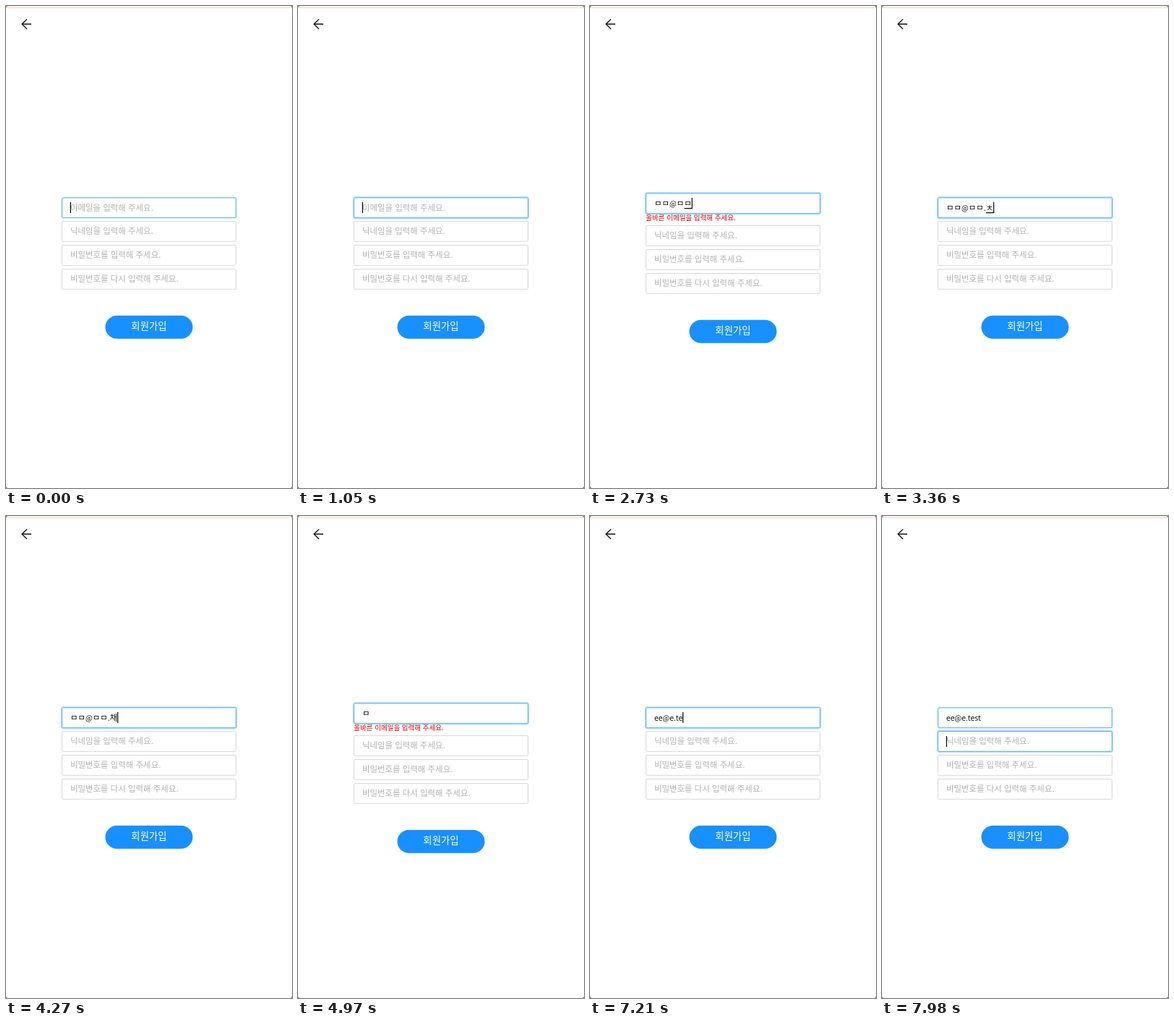
Write an HTML page that moves like this. It is 396 px wide and 666 px high and loops after 8 s.

```html
<!DOCTYPE html>
<html lang="ko">
<head>
<meta charset="utf-8">
<title>회원가입</title>
<style>
html, body { margin: 0; width: 100%; height: 100%; overflow: hidden; background: #fff; }
svg { display: block; width: 396px; height: 666px; font-family: "Noto Sans CJK KR", "Noto Sans CJK", sans-serif; }
.box { fill: #fff; stroke: #d9d9d9; }
.glow { fill: none; stroke: #1890ff; stroke-width: 4.4; stroke-opacity: .2; }
.label { font-size: 11.45px; fill: #b4b4b4; }
#value { font-size: 11.45px; fill: #111; }
#value .latin { font-size: 10.35px; }
#error { font-size: 9.5px; fill: #dc0000; }
#submit { font-size: 13.4px; font-weight: 500; fill: #fff; text-anchor: middle; }
</style>
</head>
<body>
<svg viewBox="0 0 396 666">
  <rect width="396" height="2" fill="#fdf3ee"/>
  <rect y="2" width="396" height="1" fill="#f5ded4"/>
  <path d="M0 0h2L0 2zM396 0h-2l2 2zM0 666h2l-2-2zM396 666h-2l2-2z" fill="#777"/>
  <path d="M35 25H22.5M29 18.3L22 25L29 31.7" fill="none" stroke="#111" stroke-width="1.3"/>
  <g id="first">
    <text id="value" x="89" y="282.6"></text>
    <rect id="underline" y="285" height="1.3" fill="#111"/>
  </g>
  <text id="error" x="77.3" y="296"></text>
  <g id="rest">
    <rect x="137.5" y="427.7" width="121" height="32" rx="16" fill="#1890ff"/>
    <text id="submit" x="198" y="447.4">회원가입</text>
  </g>
  <rect id="caret" y="271" width="1.2" height="15" fill="#000"/>
</svg>
<script>
const LOOP = 8000, FADE = 300, TAB = 7560, SHIFT = 6;
const LABELS = ["이메일을", "닉네임을", "비밀번호를", "비밀번호를 다시"].map(s => s + " 입력해 주세요.");
const INVALID = "올바른 이메일을 입력해 주세요.";

// [time, typed text, caret shown, last syllable still being composed]
const KEYS = [
  [0, "", 1], [560, "", 0], [1050, "", 1],
  [1470, "ㅁ", 1, 1], [1750, "ㅁㅁ", 1, 1], [2100, "ㅁㅁ", 1], [2240, "ㅁㅁ@", 1],
  [2520, "ㅁㅁ@ㅁ", 1, 1], [2730, "ㅁㅁ@ㅁㅁ", 1, 1], [3010, "ㅁㅁ@ㅁㅁ.", 1],
  [3290, "ㅁㅁ@ㅁㅁ.ㅊ", 1, 1], [3500, "ㅁㅁ@ㅁㅁ.채", 1, 1],
  [3990, "ㅁㅁ@ㅁㅁ.채", 0, 1], [4130, "ㅁㅁ@ㅁㅁ.채", 0], [4270, "ㅁㅁ@ㅁㅁ.채", 1],
  [4340, "ㅁㅁ@ㅁㅁ.", 1], [4480, "ㅁㅁ@ㅁㅁ", 1], [4620, "ㅁㅁ@ㅁ", 1],
  [4690, "ㅁㅁ@", 1], [4830, "ㅁㅁ", 1], [4900, "ㅁ", 1], [4970, "ㅁ", 0],
  [5110, "", 1],
  [5530, "e", 1], [5740, "ee", 1], [6230, "ee", 0], [6370, "ee@", 1],
  [6580, "ee@e", 1], [6790, "ee@e.", 1], [7070, "ee@e.t", 1],
  [7140, "ee@e.te", 1], [7280, "ee@e.tes", 1], [7420, "ee@e.test", 1]
];

const $ = id => document.getElementById(id);
const value = $("value"), caret = $("caret"), underline = $("underline"), error = $("error");

const fields = LABELS.map((label, i) => {
  const y = 264.9 + 33 * i - (i ? .4 : 0);
  const g = document.createElementNS("http://www.w3.org/2000/svg", "g");
  g.innerHTML = `<rect class="glow" x="77.5" y="${y}" width="241" height="27.8" rx="2"/>
    <rect class="box" x="77.5" y="${y}" width="241" height="27.8" rx="1.6"/>
    <text class="label" x="89" y="${y + 17.7}">${label}</text>`;
  $(i ? "rest" : "first").prepend(g);
  const [glow, box, text] = g.children;
  return { glow, box, text };
});

const mix = (a, b, p) => a + (b - a) * p;
const ease = p => { p = Math.min(1, Math.max(0, p)); return 1 - (1 - p) ** 2; };
const move = (el, dy) => el.setAttribute("transform", `translate(0 ${dy})`);
const show = (el, on) => el.style.display = on ? "" : "none";

function setValue(text) {
  if (value.dataset.text === text) return;
  value.dataset.text = text;
  value.innerHTML = text.replace(/[!-~]+/g, s => `<tspan class="latin">${s}</tspan>`);
}

function draw(t) {
  const [, text, blink, composing] = KEYS.findLast(k => k[0] <= t);
  const valid = /@.+\../.test(text);
  const message = t < 1470 || valid ? "" : text ? INVALID : LABELS[0];
  const dy = message ? SHIFT : 0;
  const tabbed = t >= TAB;
  const next = ease((t - TAB) / FADE);

  setValue(text);
  show(fields[0].text, !text);
  error.textContent = message;
  move($("first"), -dy);
  move($("rest"), dy);

  fields.forEach(({ glow, box }, i) => {
    glow.style.opacity = i > 1 ? 0 : i ? next : ease(t / FADE) * (1 - next);
    const p = i > 1 ? 0 : i ? next : 1;
    box.style.stroke = `rgb(${mix(217, 64, p)},${mix(217, 169, p)},${mix(217, 255, p)})`;
  });

  const end = 89 + (text ? value.getComputedTextLength() : 0);
  show(underline, composing);
  underline.setAttribute("x", end - 10.3);
  underline.setAttribute("width", 10.3);
  show(caret, blink);
  caret.setAttribute("x", (tabbed ? 89 : end) - .2);
  move(caret, tabbed ? 33 : -dy);
}

function tick(now) {
  draw(now % LOOP);
  requestAnimationFrame(tick);
}
draw(0);
requestAnimationFrame(tick);
</script>
</body>
</html>
```
